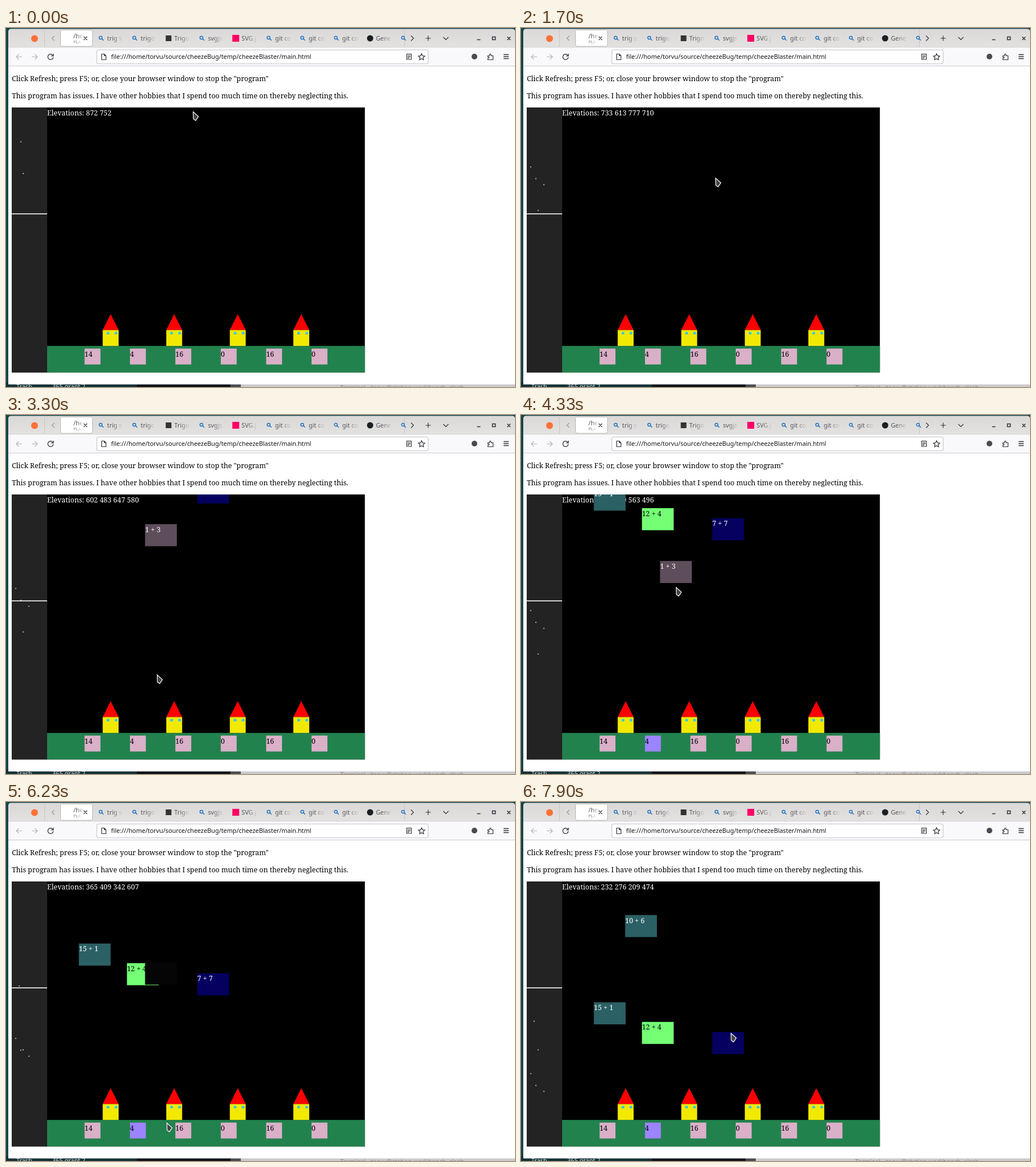
Write an HTML page that moves like this. It is 891x628 px and loops after 8 s.

```html
<!DOCTYPE html>
<html lang="en">
<head>
<meta charset="utf-8">
<title>Falling sums</title>
<style>
html, body { margin: 0; width: 100%; height: 100%; overflow: hidden; }
svg { display: block; }
text { white-space: pre; }
.ui { font: 10.83px "Noto Sans", sans-serif; }
.page { font: 12.36px "Noto Serif", serif; }
.icon { fill: none; stroke: #33333b; stroke-width: 1.2; }
</style>
</head>
<body>
<svg width="891" height="628" viewBox="0 0 891 628">
  <defs>
    <linearGradient id="header" x2="0" y2="1">
      <stop offset="0" stop-color="#dad9d8"/>
      <stop offset="1" stop-color="#e5e3e1"/>
    </linearGradient>
    <linearGradient id="fadingInk">
      <stop offset=".4" stop-color="#55555c"/>
      <stop offset="1" stop-color="#55555c" stop-opacity=".1"/>
    </linearGradient>
  </defs>

  <!-- desktop -->
  <rect width="891" height="628" fill="#15454c"/>
  <rect y="620" width="229" height="8" fill="#123238"/>
  <rect x="229" y="620" width="164" height="8" fill="#10131a"/>
  <rect x="393" y="620" width="18" height="8" fill="#4a4d50"/>
  <rect x="411" y="620" width="480" height="8" fill="#cacaca"/>
  <g class="ui" fill="#ddd">
    <text x="18" y="631">Trash</text>
    <text x="81" y="631">365 grant 2</text>
    <text x="585" y="633" fill="#888">Terminal - torvu@station.workbench..slash</text>
  </g>

  <!-- browser window -->
  <path d="M4 40V6.500q0-5 5-5H886q5 0 5 5V40z" fill="url(#header)"/>
  <rect x="4" y="34" width="887" height="32" fill="#f9f9fb"/>
  <rect x="4" y="66" width="887" height="557.500" fill="#fff"/>
  <path d="M4 66.500H891" stroke="#ccccd2"/>
  <path d="M4 33.700H891" stroke="#d2d0ce" stroke-width=".8"/>
  <path d="M67.500 3V33M697.500 3V33" stroke="#c9c7c5"/>
  <circle cx="50" cy="18.500" r="6" fill="#ff7139"/>
  <rect x="95.500" y="3.500" width="56" height="28.500" rx="3" fill="#fff" stroke="#bbb9b7"/>
  <g class="ui" fill="url(#fadingInk)">
    <text x="118" y="18">/he</text>
    <text x="118" y="27" font-size="7.500" style="font-size:7.5px" opacity=".7">PLA</text>
  </g>
  <g id="tabs" class="ui"></g>

  <g class="icon">
    <path d="M84.500 14l-4 4 4 4" stroke="#999"/>
    <path d="M136 15l6 6m0-6l-6 6M709 13.500l4.500 4.500-4.500 4.500M734.500 18h9m-4.500-4.500v9M765.500 16l4.500 4.500 4.500-4.500"/>
    <path d="M824.500 20.500h6M851.500 15.500h5v5h-5zM877.500 15.500l5.500 5.500m0-5.500l-5.500 5.500" stroke-width="1.600"/>
    <path d="M28 50.500H18m4.500-4.500L18 50.500l4.500 4.500M45 50.500h10m-4.500-4.500l4.500 4.500-4.500 4.500" stroke="#b4b4ba"/>
    <path d="M82 47.800a4.800 4.800 0 1 0 .8 3.400M83 45v3.800h-3.800" stroke-width="1.300"/>
    <rect x="159" y="38.500" width="580" height="24" rx="3" fill="#fff" stroke="#c8c8ce"/>
    <path d="M167.500 45.500h4.500l3 3v7h-7.500zM172 45.500v3h3"/>
    <path d="M701.500 45.500h8v9.500h-8zM703 48h5m-5 2.300h5m-5 2.300h3"/>
    <path d="M727.500 45l1.700 3.600 3.900.5-2.900 2.700.8 3.900-3.500-1.900-3.500 1.900.8-3.900-2.900-2.700 3.900-.5z"/>
    <path d="M843.500 48.500h3v-1.500a1.300 1.300 0 0 1 2.600 0v1.500h3.400v7h-9v-2.500h1.500a1.300 1.300 0 0 0 0-2.400h-1.500z"/>
    <path d="M871 46.500h9m-9 3.500h9m-9 3.500h9" stroke-width="1.300"/>
  </g>
  <circle cx="820" cy="50" r="5" fill="#4a4a52"/>
  <text class="ui" x="184" y="54" fill="#15141a">file:///home/torvu/source/cheezeBug/temp/cheezeBlaster/main.html</text>

  <!-- page -->
  <g class="page">
    <text x="10.200" y="92.500">Click Refresh; press F5; or, close your browser window to stop the "program"</text>
    <text x="10.200" y="122.500">This program has issues. I have other hobbies that I spend too much time on thereby neglecting this.</text>
  </g>
  <svg x="10.200" y="139" width="618" height="463.500" viewBox="10.200 139 618 463.500" class="page">
    <rect x="10" y="139" width="619" height="464" fill="#000"/>
    <rect x="10" y="139" width="62" height="464" fill="#232323"/>
    <rect x="10" y="324.400" width="62" height="1.540" fill="#fff"/>
    <rect x="72" y="556.150" width="557" height="47" fill="#22824d"/>
    <g id="scenery"></g>
    <text id="elevations" x="72" y="152.800" fill="#fff"></text>
    <g id="blocks"></g>
    <g id="radar"></g>
  </svg>
  <path id="cursor" d="M.6.600L1 13 5 15.800 9.800 8.800z" fill="#444" stroke="#fff" stroke-width="1.200"/>
</svg>

<script>
const LOOP = 8000, TOP = 139, SCALE = .7725, RADAR_SCALE = .4635;
const BLOCK_W = 55.6, BLOCK_H = 38.6, FADE = 1580, SELECT_TIME = 3800;
const $ = id => document.getElementById(id);

function add(parent, tag, attrs, content = '') {
  const node = document.createElementNS('http://www.w3.org/2000/svg', tag);
  for (const name in attrs) node.setAttribute(name, attrs[name]);
  node.textContent = content;
  return parent.appendChild(node);
}
const rect = (parent, x, y, width, height, fill) =>
  add(parent, 'rect', { x, y, width, height, fill });

// Browser tabs
['trig s', 'trigo', 'Trigo', 'svgjs', 'SVG.j', 'git co', 'git co', 'git co', 'Gene', ''].forEach((label, i) => {
  const tabs = $('tabs'), x = 167 + i * 58.8;
  if (i === 2) rect(tabs, x - 5, 13, 10, 10, '#333');
  else if (i === 4) rect(tabs, x - 6, 12, 12, 12, '#ff0066');
  else if (i === 8) add(tabs, 'circle', { cx: x, cy: 18, r: 5.5, fill: '#1b1f23' });
  else add(tabs, 'path', {
    d: `M${x + .8} 18.8l3 3M${x + 1.3} 17a2.600 2.600 0 1 1-5.200 0a2.600 2.600 0 1 1 5.200 0`,
    fill: 'none', stroke: '#2374c6', 'stroke-width': 1.5
  });
  add(tabs, 'text', { x: x + 10, y: 22.3, fill: 'url(#fadingInk)' }, label);
});

// Houses and answers
for (let i = 0; i < 4; i++) {
  const x = 169.3 + i * 111.24, g = $('scenery');
  add(g, 'path', { d: `M${x} 528.350l13.900-27.800 13.900 27.800z`, fill: '#f00' });
  rect(g, x, 528.35, 27.8, 27.8, '#f2e900');
  for (const dx of [7, 21]) rect(g, x + dx, 531.6, 4.6, 4.4, '#38c8f0');
}
const answers = [14, 4, 16, 0, 16, 0].map((value, i) => {
  const x = 137.56 + i * 79.46;
  const box = rect($('scenery'), x, 560.8, 27.8, 27.8, '#d9b0c8');
  add($('scenery'), 'text', { x, y: 574.8 }, value);
  return box;
});

// Falling blocks: heights are relative to the first one
const blocks = [
  { sum: '12 + 4', x: 211.7, dot: 26, offset: 0, color: [116, 255, 116], ink: '#000' },
  { sum: '1 + 3', x: 243.4, dot: 30, offset: -119.6, color: [94, 78, 92], hit: 4750 },
  { sum: '15 + 1', x: 127.5, dot: 17, offset: 44.4, color: [43, 96, 100], born: 500 },
  { sum: '7 + 7', x: 334.7, dot: 40, offset: -22.8, color: [5, 0, 95], born: 500, hit: 7900 },
  { sum: '10 + 6', x: 182.3, dot: 23, offset: 242, color: [43, 96, 100], born: 4700 }
].map(block => {
  const { x, sum, ink = '#fff', dot } = block;
  const group = add($('blocks'), 'g', {});
  return {
    born: 0, hit: Infinity, ...block, group,
    box: rect(group, x, 0, BLOCK_W, BLOCK_H, ''),
    label: add(group, 'text', { x, y: 13.8, fill: ink }, sum),
    blip: rect($('radar'), dot - .7, 0, 1.54, 1.54, '#fff')
  };
});

const fall = [[0, 872], [1700, 733], [3300, 602.4], [4330, 519], [5200, 450.4], [6230, 365], [7900, 232], [8000, 224]];
const pointer = [
  [0, 327, 146], [200, 327, 147], [930, 334, 190], [1300, 336, 220], [1700, 340, 262],
  [2150, 376, 290], [2300, 380, 297], [3000, 330, 368], [3300, 264, 454], [3600, 226, 575],
  [3930, 226, 575], [4330, 271, 301], [4750, 268, 318], [5200, 267, 322], [5530, 267, 328],
  [6230, 281, 561], [6400, 285, 570], [6700, 290, 589], [7300, 345, 470], [7700, 367, 406], [7900, 367, 404], [8000, 367, 404]
];
// Start of each stretch and the number of redraws in it
const ticks = [
  [0, 1], [30, 1], [200, 21], [930, 1], [1300, 6], [1700, 20], [3300, 13],
  [4330, 11], [5200, 13], [6230, 19], [7900, 1], [8000, 1]
];

function segment(keys, t) {
  const i = Math.max(1, keys.findIndex(key => key[0] > t));
  return [keys[i - 1], keys[i]];
}
function snap(t) {
  const [[start, count], [end]] = segment(ticks, t);
  const step = (end - start) / count;
  return start + Math.floor((t - start) / step + 1e-6) * step;
}
function interpolate(keys, t) {
  const [a, b] = segment(keys, t);
  const part = (t - a[0]) / (b[0] - a[0]);
  return a.slice(1).map((value, i) => value + (b[i + 1] - value) * part);
}

function draw(time) {
  const t = snap(time), listed = [];
  for (const b of blocks) {
    const alive = t >= b.born;
    const height = interpolate(fall, Math.min(t, b.hit))[0] + b.offset;
    const light = Math.max(0, 1 - Math.max(0, t - b.hit) / FADE);
    b.group.setAttribute('display', alive ? 'inline' : 'none');
    b.group.setAttribute('transform', `translate(0 ${TOP + (550 - height) * SCALE})`);
    b.box.setAttribute('fill', `rgb(${b.color.map(c => Math.round(c * light))})`);
    b.label.setAttribute('display', t < b.hit ? 'inline' : 'none');
    b.blip.setAttribute('display', alive ? 'inline' : 'none');
    b.blip.setAttribute('y', TOP + (1000 - height) * RADAR_SCALE);
    if (alive && t <= b.hit) listed.push(Math.round(height));
  }
  $('elevations').textContent = 'Elevations: ' + listed.join(' ');
  answers[1].setAttribute('fill', t < SELECT_TIME ? '#d9b0c8' : '#9c84ff');
  $('cursor').setAttribute('transform', `translate(${interpolate(pointer, t)})`);
}

function loop() {
  draw(performance.now() % LOOP);
  requestAnimationFrame(loop);
}
loop();
</script>
</body>
</html>
```
